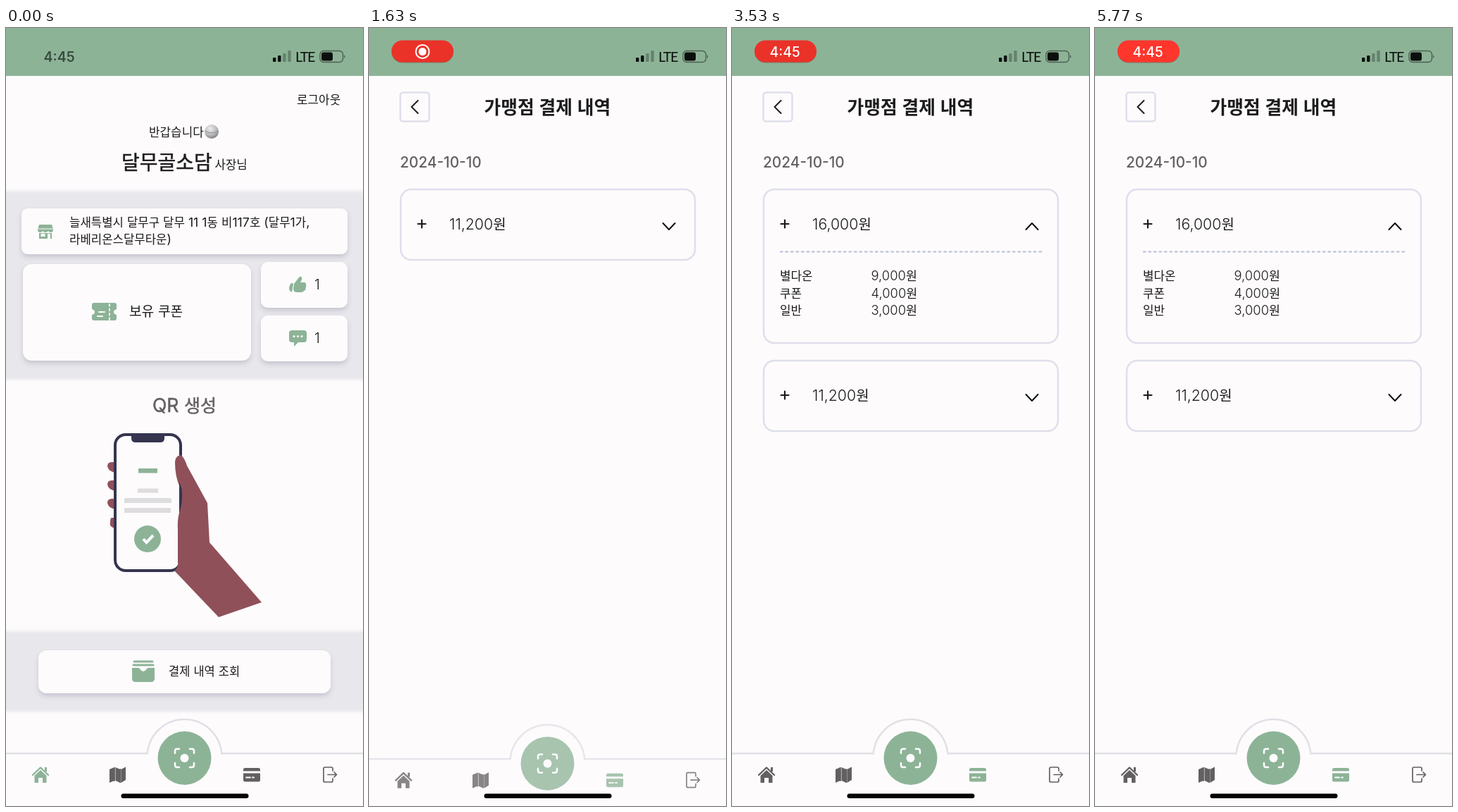
Write an HTML page that moves like this. It is 507 by 1104 pixels and loops after 5810 ms.

```html
<!DOCTYPE html>
<html lang="ko">
<head>
<meta charset="utf-8">
<title>Shop payments</title>
<style>
html, body { margin: 0; width: 100%; height: 100%; overflow: hidden; background: #fdfbfc; }
svg { display: block; width: 100vw; height: 100vh; }
text { white-space: pre; font-family: Inter, "Noto Sans CJK KR", "Noto Sans CJK", sans-serif; }
.ko { font-family: "Noto Sans CJK KR", "Noto Sans CJK", sans-serif; }
.line { fill: none; stroke-linecap: round; stroke-linejoin: round; }
</style>
</head>
<body>
<svg id="stage" viewBox="0 0 507 1104" preserveAspectRatio="none"></svg>
<script>
const LOOP = 5810;
const GREEN = '#8db397', PAPER = '#fdfbfc', GREY = '#636062', INK = '#1c1b1d';
const NAVY = '#35344f', SKIN = '#8f5059', EDGE = '#dfdfeb';

const OPEN_PAGE = 1480, NEW_PAYMENT = 1860, EXPAND = 2560, SHOW_TIME = 3100;

// Hangul runs are set slightly smaller than Latin runs.
function text(x, y, size, str, { fill = INK, weight = 400, extra = '' } = {}) {
  const runs = str.match(/[가-힣]+|[^가-힣]+/g).map(run =>
    /[가-힣]/.test(run) ? `<tspan class="ko" font-size="${size * 0.94}">${run}</tspan>` : `<tspan>${run}</tspan>`);
  return `<text x="${x}" y="${y}" font-size="${size}" font-weight="${weight}" fill="${fill}" ${extra}>${runs.join('')}</text>`;
}
const rect = (x, y, w, h, r, fill, extra = '') =>
  `<rect x="${x}" y="${y}" width="${w}" height="${h}" rx="${r}" fill="${fill}" ${extra}/>`;
const circle = (x, y, r, fill, extra = '') => `<circle cx="${x}" cy="${y}" r="${r}" fill="${fill}" ${extra}/>`;
const path = (d, fill, extra = '') => `<path d="${d}" fill="${fill}" ${extra}/>`;
const line = (d, stroke, width, extra = '') =>
  `<path class="line" d="${d}" stroke="${stroke}" stroke-width="${width}" ${extra}/>`;
const group = (id, body, extra = '') => `<g id="${id}" ${extra}>${body}</g>`;
const bold = color => `stroke="${color}" stroke-width=".5"`;

const defs = `<defs>
  <filter id="lift" x="-10%" y="-20%" width="120%" height="150%">
    <feDropShadow dx="0" dy="4" stdDeviation="3" flood-color="#4a4866" flood-opacity=".2"/>
  </filter>
  <filter id="soft" x="-5%" y="-5%" width="110%" height="110%"><feGaussianBlur stdDeviation="2"/></filter>
  <radialGradient id="ball" cx=".4" cy=".3" r=".75">
    <stop offset="0" stop-color="#eeeeef"/><stop offset=".6" stop-color="#b9b9bc"/><stop offset="1" stop-color="#77777b"/>
  </radialGradient>
</defs>`;

const band = (y, h) => rect(-10, y, 527, h, 0, '#e8e7eb', 'filter="url(#soft)"');
const panel = (x, y, w, h, r) => rect(x, y, w, h, r, PAPER, 'filter="url(#lift)"');

const storeIcon =
  path('M47 279H65L67 286Q67 290 63.500 290Q61 290 60 288Q58.500 290 56 290Q53.500 290 52 288Q51 290 48.500 290Q45 290 45 286Z', GREEN) +
  path('M47 291H65V299H47Z', GREEN) + rect(49.5, 292, 6, 4, 0, PAPER) + rect(59, 292, 4, 7, 0, PAPER) +
  line('M46 285H66', PAPER, 1);

const ticketIcon =
  path('M125 390H154Q157 390 157 393V399Q153 400 153 403Q153 406 157 407V412Q157 415 154 415H125Q122 415 122 412V407Q126 406 126 403Q126 400 122 399V393Q122 390 125 390Z', GREEN) +
  line('M147 392V414', PAPER, 2, 'stroke-dasharray="2.500 4"') + line('M132 403H140M130 409H137', PAPER, 2);

const thumbIcon =
  path('M409 363L416 354Q418 351 420 354Q421 356 418 361H424Q427 362 426 365Q427 367 425.500 369Q426 372 423 373Q422 375 419 375H413Q409 375 408 371Z', GREEN) +
  path('M404 363Q407 361 408 363L406.500 372Q407 375 404 374Q400 370 404 363Z', GREEN);

const chatIcon =
  path('M406 429H423Q427 429 427 433V442Q427 446 423 446H415L409 452V446H406Q402 446 402 442V433Q402 429 406 429Z', GREEN) +
  [409, 414.5, 420].map(x => circle(x, 437.5, 1.5, PAPER)).join('');

const walletIcon =
  line('M182 899H208M181 904H209', GREEN, 3) +
  path('M179 908H188Q190 908 190.500 910Q195 916 199.500 910Q200 908 202 908H211V923Q211 928 206 928H184Q179 928 179 923Z', GREEN);

const fingers = [616, 642, 668, 695].map((y, i) => {
  const tip = i === 3 ? 148 : 144;
  return path(`M156 ${y}H150Q${tip} ${y} ${tip} ${y + 6}Q146 ${y + 14} 156 ${y + 15}Z`, SKIN);
}).join('');

const phone = fingers +
  rect(155, 577, 93, 193, 15, PAPER, `stroke="${NAVY}" stroke-width="4"`) +
  path('M178 577H225V582Q225 588 219 588H184Q178 588 178 582Z', NAVY) +
  rect(188, 625, 27, 6.5, 0, GREEN) + rect(187, 653.5, 29, 6, 0, '#dddcde') +
  rect(168, 667, 67, 7, 0, '#dddcde') + rect(168, 681, 66, 7, 0, '#dddcde') +
  circle(201, 725, 19, GREEN) +
  line('M195 725L199.500 730L209 720', PAPER, 4, 'style="stroke-linecap:butt;stroke-linejoin:miter"') +
  path('M247 606Q240 608 240 617Q240 636 247 652Q250 664 247 684Q243 697 244 712V758Q245 766 239 770L302 836L363 815L289 730L286 674L257 621Q252 606 247 606Z', SKIN) +
  path('M246 645Q251 652 250 668Q249 680 246 687Q248 665 246 645Z', NAVY);

const home = group('home',
  text(413, 107.5, 18, '로그아웃') +
  text(203, 153.5, 18, '반갑습니다') +
  circle(292, 147, 10, 'url(#ball)') + line('M283 146Q292 152 301 146', '#8c8c90', 1) +
  text(164, 200.5, 29.8, '달무골소담', { extra: bold(INK) }) +
  text(296.5, 199.5, 17.8, '사장님') +
  band(231.5, 267.5) +
  panel(22, 256, 463, 65, 9) + panel(24, 335, 324, 137, 13) +
  panel(362, 332, 123, 65, 10) + panel(362, 408, 123, 65, 10) +
  storeIcon +
  text(90, 281.5, 17.8, '늘새특별시 달무구 달무 11 1동 비117호 (달무1가,') +
  text(90, 305.5, 17.8, '라베리온스달무타운)') +
  ticketIcon + text(175, 409, 20.4, '보유 쿠폰') +
  thumbIcon + text(438, 371, 20, '1', { weight: 300 }) +
  chatIcon + text(438, 447, 20, '1', { weight: 300 }) +
  text(208, 545, 26.6, 'QR 생성', { fill: GREY, extra: bold(GREY) }) +
  phone +
  band(856, 114) + panel(46, 883, 415, 61, 12) +
  walletIcon + text(231, 918.5, 17.6, '결제 내역 조회'));

const box = (id, h) => rect(45, 229, 418, h, 15, PAPER, `id="${id}" stroke="${EDGE}" stroke-width="2.500"`);
const entry = (amount, id) =>
  line('M69.500 278H80.500M75 272.500V283.500', INK, 2.2) +
  text(114, 286, 21.3, amount, { weight: 300 }) +
  line('M417.500 277L426 286L434.500 277', '#111', 2, `id="${id}"`);
const detail = (y, label, amount) => text(68, y, 18, label) + text(197.5, y, 18.4, amount, { weight: 300 });

const payments = group('payments',
  rect(44.5, 91.5, 41, 41, 4, PAPER, `stroke="${EDGE}" stroke-width="2.500"`) +
  line('M69.500 103L60.500 112L69.500 121', INK, 2) +
  text(163.5, 121.5, 27.4, '가맹점 결제 내역', { weight: 600 }) +
  text(44, 198, 20.8, '2024-10-10', { fill: GREY, weight: 500 }) +
  group('fresh', box('freshBox', 100) + entry('16,000원', 'arrow') +
    group('details',
      '<path d="M68 317.500H440" stroke="#b9bdd6" stroke-width="1.800" stroke-dasharray="4.500 3"/>' +
      detail(358, '별다온', '9,000원') + detail(382.5, '쿠폰', '4,000원') + detail(407, '일반', '3,000원'))) +
  group('older', box('olderBox', 100) + entry('11,200원', 'olderArrow')));

const nav = group('nav',
  path('M-4 1029.500H200.700A53 53 0 0 1 306.300 1029.500H511V1150H-4Z', PAPER,
    'stroke="#e1e0e6" stroke-width="2.500"') +
  circle(253.5, 1036, 38, GREEN) +
  line('M240 1029V1026Q240 1023 243 1023H246M261 1023H264Q267 1023 267 1026V1029M267 1043V1046Q267 1049 264 1049H261M246 1049H243Q240 1049 240 1046V1043', PAPER, 2.5) +
  circle(253.5, 1036, 6, PAPER) +
  group('homeTab',
    line('M38 1060L49 1049.500L60 1060', 'currentColor', 2.4) +
    path('M49 1053L57.500 1061V1071H52V1064H46V1071H40.500V1061Z', 'currentColor') +
    rect(55, 1049, 3, 6, 0, 'currentColor')) +
  path('M147 1052L154 1049V1068L147 1071ZM155.500 1049L162 1052V1071L155.500 1068ZM163.500 1052L170 1048.500V1067L163.500 1071Z', GREY) +
  line('M154 1050V1068M162.500 1052V1070', GREY, 1.8) +
  group('cardTab',
    rect(337, 1050, 24, 19.5, 2.5, 'currentColor') + rect(337, 1054.5, 24, 3, 0, PAPER) +
    line('M341 1063.500H347M350 1063.500H352', PAPER, 1.8)) +
  line('M464 1054V1051Q464 1049 462 1049H453Q451 1049 451 1051V1068Q451 1070 453 1070H462Q464 1070 464 1068V1065M457 1059.500H469M466 1056L469.500 1059.500L466 1063', GREY, 1.7));

const bars = [42, 39, 36, 32].map((y, i) =>
  rect(379 + i * 7.1, y, 4.4, 48 - y, 1, '#0b0f0c', `opacity="${i < 2 ? 1 : 0.3}"`)).join('');
const clock = (y, fill, weight, id) => text(53.5, y, 19.5, '4:45', { fill, weight, extra: `id="${id}"` });

const status = rect(0, 0, 507, 68, 0, GREEN) + bars +
  '<text x="411" y="48" font-size="19.700" letter-spacing="-1.400" fill="#0b0f0c" style="font-family:Lato,sans-serif">LTE</text>' +
  rect(446, 32.5, 32.5, 16, 5, 'none', 'stroke="#0b0f0c" stroke-opacity=".5" stroke-width="1.400"') +
  rect(448, 34.5, 16, 12, 3, '#0b0f0c') + path('M480 38Q483 40.500 480 43Z', '#0b0f0c', 'opacity=".5"') +
  clock(47.5, '#12201a', 600, 'plainTime') +
  group('pill',
    rect(32, 18.5, 88, 31, 15.5, '#7d4a3c', 'opacity=".6"') +
    rect(32, 17.5, 88, 31, 15.5, '#f00', 'id="pillFill"') +
    group('record', circle(76, 33.5, 9.5, 'none', 'stroke="#fff" stroke-width="2"') + circle(76, 33.5, 5.5, '#fff')) +
    clock(40.5, '#fff', 500, 'pillTime'));

document.getElementById('stage').innerHTML =
  defs + rect(0, 0, 507, 1104, 0, PAPER) + home + payments + nav + status +
  rect(163.5, 1086.5, 181, 6.5, 3.2, '#050505');

const el = id => document.getElementById(id);
const show = (id, on) => el(id).setAttribute('display', on ? 'inline' : 'none');
const fade = (id, value) => el(id).setAttribute('opacity', value);
const ramp = (t, start, length) => Math.min(1, Math.max(0, (t - start) / length));
const easeOut = p => 1 - (1 - p) ** 3;
const easeInOut = p => p * p * (3 - 2 * p);
const mix = (a, b, p) => Math.round(a + (b - a) * p);

function drawStatus(t) {
  fade('plainTime', 0.7 * (1 - ramp(t, 0, 150)));
  fade('pill', ramp(t, 50, 250));
  const glow = 0.5 - 0.5 * Math.cos((t - 1130) / 1900 * 2 * Math.PI);
  el('pillFill').setAttribute('fill', `rgb(${mix(209, 255, glow)},${mix(46, 54, glow)},${mix(38, 44, glow)})`);
  const swap = ramp(t, SHOW_TIME, 250);
  fade('record', 1 - swap);
  fade('pillTime', swap);
}

function drawList(t) {
  const isNew = t >= NEW_PAYMENT, open = t >= EXPAND;
  show('fresh', isNew);
  show('details', open);
  el('freshBox').setAttribute('height', open ? 218 : 100);
  el('older').setAttribute('transform', `translate(0 ${open ? 243 : isNew ? 125 : 0})`);
  const turn = 180 * easeInOut(ramp(t, EXPAND, 200));
  el('arrow').setAttribute('transform', `rotate(${turn} 426 281.500)`);
}

function drawNav(t, paid) {
  const p = paid ? easeOut(ramp(t, OPEN_PAGE, 400)) : 1;
  el('nav').setAttribute('transform', `translate(0 ${32 * (1 - p)})`);
  fade('nav', p);
  el('homeTab').setAttribute('color', paid ? GREY : GREEN);
  el('cardTab').setAttribute('color', paid ? GREEN : GREY);
}

function render(t) {
  const paid = t >= OPEN_PAGE;
  show('home', !paid);
  show('payments', paid);
  drawStatus(t);
  drawList(t);
  drawNav(t, paid);
}

const begin = performance.now();
function tick() {
  render((performance.now() - begin) % LOOP);
  requestAnimationFrame(tick);
}
tick();
</script>
</body>
</html>
```
